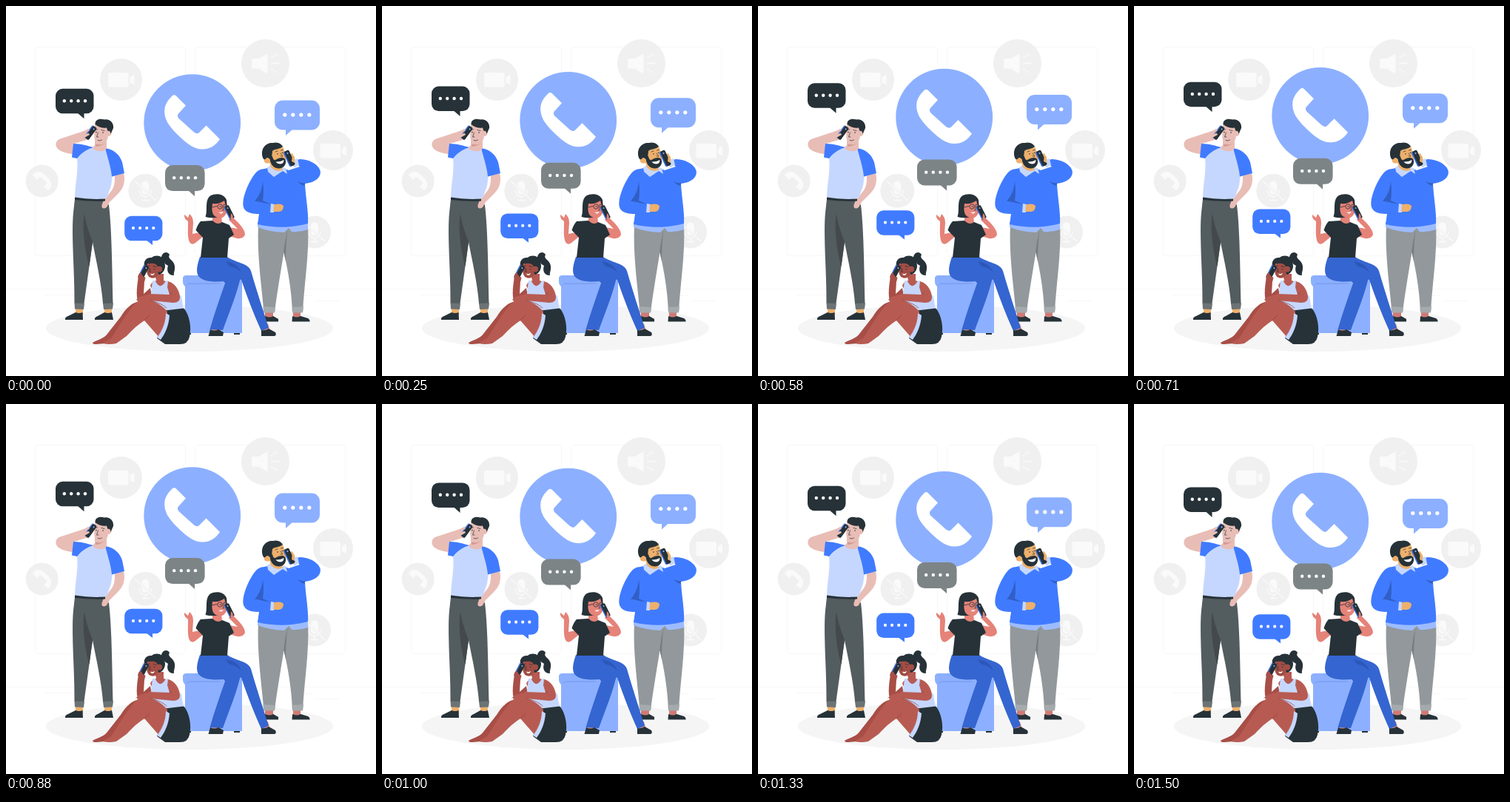
Write an HTML page that moves like this. It is 500x500 px and loops after 1540 ms.

```html
<!DOCTYPE html>
<html lang="en">
<head>
<meta charset="utf-8">
<title>On the phone</title>
<style>
html, body { margin: 0; width: 100%; height: 100%; overflow: hidden; background: #fff; }
svg { display: block; width: 100%; height: 100%; }
.ink { fill: #263238; }
.blue { fill: #407bff; }
.sky { fill: #8cb0ff; }
.ice { fill: #c6d7ff; }
.line { fill: none; stroke: #263238; stroke-width: .7; stroke-linecap: round; stroke-linejoin: round; }
</style>
</head>
<body>
<svg viewBox="0 0 500 500" xmlns="http://www.w3.org/2000/svg">
  <defs>
    <path id="handset" d="M224.500 121.500Q227 119 229.500 121L243 134.500L232.500 146Q231 149 233.500 152L254 170.500Q258 173.500 260.500 171.500L270.500 161.500L289 180C283 189 275 194 264 193.500C252 193 241 183 231 173C220 162 212.500 152 214.500 138C216 131 220 126 224.500 121.500Z"/>
    <g id="camera">
      <rect x="-17.500" y="-9.500" width="27.500" height="19.500" rx="2.500"/>
      <path d="M12 -3L16 -6Q18 -6.500 18 -4.500V5Q18 7 16 6L12 3.500Z"/>
    </g>
    <g id="mic">
      <rect x="-5" y="-13" width="10" height="18" rx="5"/>
      <path d="M-8 -1C-8 11 8 11 8 -1M0 8V13M-5 13H5" fill="none" stroke="#fafafa" stroke-width="1.300"/>
      <path d="M-14 -13L14 13" stroke="#f0f0f0" stroke-width="3"/>
      <path d="M-14 -13L14 13" stroke="#fafafa" stroke-width="1.300"/>
    </g>
    <g id="mobile">
      <rect x="-3.500" y="-10" width="7.500" height="20" rx="1.800" fill="#263238"/>
      <path d="M-3.500 -8V8Q-3.500 10 -1.500 10H-.5Q-2.300 9.500 -2.300 7.500V-7.500Q-2.300 -9.500 -.5 -10Q-3.500 -10 -3.500 -8Z" fill="#407bff"/>
      <circle cx="1" cy="-6.500" r="1" fill="#8cb0ff"/>
    </g>
  </defs>

  <g id="backdrop">
    <g fill="none" stroke="#f7f7f7">
      <rect x="39.500" y="55.500" width="203" height="282" rx="3"/>
      <rect x="255.500" y="55.500" width="203" height="282" rx="3"/>
      <path d="M0 382.500H500M417 398.500H450M398 391.500H414M52 390.500H92M113 398.500H128"/>
    </g>
    <g fill="#f0f0f0">
      <circle cx="155.500" cy="99.500" r="28.500"/>
      <circle cx="350.500" cy="77.500" r="32.500"/>
      <circle cx="442" cy="195" r="27"/>
      <circle cx="48.700" cy="236.500" r="22"/>
      <circle cx="188.300" cy="249.700" r="23"/>
      <circle cx="417" cy="305.500" r="22"/>
    </g>
    <g fill="#fafafa">
      <use href="#camera" x="155.500" y="99.500"/>
      <use href="#camera" x="442" y="195.500"/>
      <use href="#mic" x="188.300" y="249.700"/>
      <use href="#mic" x="417" y="305.500"/>
      <use href="#handset" transform="translate(48.700 236.500) rotate(180) scale(.34) translate(-251 -157)"/>
      <path d="M334 71H341L353.500 64.500V91.500L341 84.500H334Q332 84.500 332 82V73.500Q332 71 334 71Z"/>
      <path d="M358 70L366 65M359 77.500H369M358 85L367 90" stroke="#fafafa" stroke-width="1.300" stroke-linecap="round"/>
    </g>
    <ellipse cx="248" cy="435.500" rx="194" ry="31.500" fill="#f5f5f5"/>
  </g>

  <g id="floating"></g>

  <g id="tall-man">
    <path fill="#eeb06b" d="M94 408H104V418H94ZM133 408H143V418H133Z"/>
    <path class="ink" d="M94 414Q99 416 103.500 414L104 424H80Q79 421 84 419ZM133 414Q138 416 143 414L145 424H120Q119 421 124 419Z"/>
    <path fill="#535c5f" d="M93 261H134L139 269C143 300 143.500 360 144.500 402H131C129 375 122 345 117 319L105.500 402H92.500C93 360 88 310 91 279Z"/>
    <path fill="#43494c" d="M106 281C103 295 105 325 112.500 352L117 319C112 305 108 295 106 281Z"/>
    <path fill="#6c7375" d="M92.500 401.500L106 402L105 410L93 409.500ZM131 402L145 401.500L144 409.500L132 410Z"/>
    <g fill="#e8bdb6">
      <path d="M147 229L159 226C162 238 158 247 152 253L140 265L136 272Q132 275 129.500 272Q129 268 132 263L143 249C147 243 147 237 147 229Z"/>
      <path d="M108 168C96 172 80 177 72 180C66 183 66 190 71 194C77 198 86 200 93 200L95 188C92 187 91 187 92 186L112 180L117 173L116 165Z"/>
    </g>
    <path class="ice" d="M101 193C112 190 128 190 139 194C145 208 145 226 142 243L136 260Q116 263 93 260C93 242 98 225 96 205Z"/>
    <path class="ink" d="M93 258.500Q114 262 134 260.500V263.500Q114 264.500 93 262Z"/>
    <path class="blue" d="M91 186C101 186 111 189 118 191C111 193 102 198 96 206L89 204.500ZM134 192C147 194 154 202 157 211L160 226L143 230.500C142 218 137 204 134 192Z"/>
    <path fill="#e8bdb6" d="M120 180H136V191C136 198 120 198 117 191L120 188Z"/>
    <path fill="#d39d96" d="M121 187Q129 187 135 179V183Q130 190 121 190Z"/>
    <path fill="#e8bdb6" d="M120 160C125 159 136 161 138.500 168Q143 167 142.500 172Q142 176 138 176C137 184 131 188 125 187C119 186 118.500 177 120 160Z"/>
    <path class="ink" d="M120.500 160C120 153 127 151.500 133 153.500C140 152 146 158 145 165L141.500 173Q141 168 137.500 169L136 164.500C131 165.500 125 164 120.500 160Z"/>
    <path class="line" d="M120.500 167.500L123.500 166.800M129 167.500L133 168.500M124.500 171L122.500 177H125M124 181.500Q127 183 129.500 181"/>
    <circle class="ink" cx="122" cy="170.500" r=".8"/><circle class="ink" cx="131" cy="171" r=".8"/>
    <use href="#mobile" transform="translate(114 171) rotate(36)"/>
    <path d="M104 170L111 166L113 168L106 173L112 172L113 174L106 178Z" fill="#e8bdb6"/>
  </g>

  <g id="bearded-man">
    <path fill="#cf7a75" d="M350 411H361V422H350ZM388 411H398V422H388Z"/>
    <path class="ink" d="M350 419Q356 422 361 419L368 423V426.500H347V421ZM387 419Q393 422 398 419L408 422Q411 424 410.500 426.500H386.500Z"/>
    <path fill="#92989b" d="M341 296H408C410 335 403 375 401 414H387C386 385 381 357 375.500 333C371 360 366 390 363 414H348.500C345 375 339 335 341 296Z"/>
    <path fill="#757b7e" d="M380 303C378 315 376 323 375.500 333L378 345C377.500 333 379 319 380 303Z"/>
    <path fill="#a5aaad" d="M347.500 406L364 407L363 414.500H348ZM386.500 407L402 406L401 414.500H387Z"/>
    <path fill="#9dbcff" d="M340 292H408V302Q397 306 386 305L382 300L376 306Q355 305 340 299Z"/>
    <path class="blue" d="M349 220C361 217 374 218 382 222L397 217L390 211L396 207C409 207 421 213 424.500 222C427 232 416 239 404 240C405 260 409 278 408 294Q375 303 340 295L342 281C326 281 319 276 320.500 264C323 247 333 229 340 223Q344 220 349 220Z"/>
    <path fill="#315fc7" d="M347 237C346 248 342 257 336 263.500L358 268L347 263Q349 250 347 237ZM394 237Q400 240 404 239V243Q398 242 394 237Z"/>
    <path class="ice" d="M358 267L363 268L362 279L357 279Z"/>
    <path fill="#eeb06b" d="M362 268.500Q371 266 375 270Q375 277 369 278L361.500 278Z"/>
    <path class="ice" d="M353 218L358 215L378 219L380 227L374 223L362 231L354 224Z"/>
    <path fill="#eeb06b" d="M355 207L372 216L374 221Q366 226 358 218Z"/>
    <path fill="#eeb06b" d="M352 195C355 187 372 185 375 192L378 207C378 214 373 219 366 218C359 217 357 212 356 212Q349 214 348.500 208Q349 203 355 204Z"/>
    <path class="ink" d="M347 205C343 192 352 184 361 185C367 183 373 187 374 190C369 194 363 193 360 196L359 205L356.500 207Q353 203 350.500 207Q348 208 347 205Z"/>
    <path class="ink" d="M356.500 204L360 203Q361 209 364 208Q369 204.500 374 205Q377.500 206 378 209C379 215 374 220 368 219.500C361 219 356.500 213 356.500 204Z"/>
    <path fill="#fff" d="M364.500 210.500Q370 211 375.500 208Q375.500 213 371 213.500Q366.500 213.500 364.500 210.500Z"/>
    <path class="line" d="M364 197L367 196M371.500 195L374.500 194.500M371 199L374 203H371"/>
    <circle class="ink" cx="367" cy="200" r=".8"/><circle class="ink" cx="373.500" cy="198.500" r=".8"/>
    <path fill="#eeb06b" d="M379 202L387 199L390 206L394 212L389 217L381 212Z"/>
    <path class="ice" d="M389 208L394 206L396 215L389 219Z"/>
    <use href="#mobile" transform="translate(382.500 206) rotate(-25) scale(1.100)"/>
    <path fill="#eeb06b" d="M387 201L390 204V212L386 210Z"/>
  </g>

  <g id="seated-woman">
    <path class="ink" d="M243 440H250V444H243ZM308 440H316V444H308Z"/>
    <path class="sky" d="M244 364H314Q319 365 319 371V442H242V379Q239 377 239 372V368Q239 364 244 364Z"/>
    <path fill="#7c9fef" d="M243 378Q245 374.500 249 374.500H290L289 376H250Q246 376 243 378Z"/>
    <path fill="#e58a80" d="M281 430L290 433L287 441L279 439ZM346 430L354 429L357 440L348 441Z"/>
    <path fill="#2c57b7" d="M271 342L318 349L326 360L299 378Z"/>
    <path fill="#3565d0" d="M262 339H299C310 347 327 347 331 358C338 382 347 410 355 435L345 439C336 419 326 394 318 370L300 364Z"/>
    <path fill="#3565d0" d="M262 339H293C304 350 318 352 318 362C313 387 302 413 293 438L275.500 437C282 414 290 392 297 372C280 373 267 373 260 365C256 358 259 348 262 339Z"/>
    <path d="M297 345Q314 348 317.500 360Q313 354 301 351Z" fill="#2c57b7"/>
    <path class="ink" d="M276 437Q282 440 287 437L294 441L293 446H273.500ZM345 438Q350 439 355 436L364 441Q366 445 363 446H345Z"/>
    <g fill="#e58378">
      <path d="M262 306L252 308L253 293Q253 285 248 281L246 286L241 282Q240 287 246 291C246 303 245 313 248 319Q251 324 256 320L267 311Z"/>
      <path d="M302 299L313 301L301 289L305 284L311 290C318 297 323 303 323 309Q321 315 312 314L302 311Z"/>
      <path d="M279 284H291L292 292Q287 300 279 293Z"/>
    </g>
    <path class="ink" d="M263 291L279 290Q286 297 292 292L302 296L308 309L301 314L299 340H263L266 313L256.500 303Q259 295 263 291Z"/>
    <path class="ink" d="M269.500 285C273 276 268 263 276 256.500C284 252 295 254 298 262C299 272 300 280 294 284Q280 288 269.500 285Z"/>
    <path fill="#e58378" d="M279 267Q288 268 295 263L298 273C299 283 293 288 287 286C280 285 277 279 279 267Z"/>
    <g fill="none" stroke="#263238" stroke-width=".8">
      <circle cx="289" cy="271" r="3.200"/><circle cx="296" cy="270.500" r="2.500"/>
      <path d="M285.500 270.500L278 272"/>
    </g>
    <circle class="ink" cx="289.500" cy="271" r=".8"/><circle class="ink" cx="296" cy="270.500" r=".7"/>
    <path fill="#fff" d="M287.500 278.500Q291 279.500 293.500 277.500Q293 280.500 290.500 280.500Q288.500 280.500 287.500 278.500Z"/>
    <path class="line" d="M293 273L294.500 276H292.500M287 266L290 265"/>
    <use href="#mobile" transform="translate(301.500 279) rotate(-27) scale(.95)"/>
    <path fill="#e58378" d="M304 280L306.500 283L307 289L303.500 288Z"/>
  </g>

  <g id="floor-girl">
    <path class="ink" d="M210 342C209 333 218 330 221 336C218 341 224 342 227 348C230 355 226 360 227 364C218 364 217 356 219 351Q216 350 213 346Z"/>
    <path class="ink" d="M217 411L241 409C248 419 251 434 248 447Q246 457 235 457H215L204 449Z"/>
    <path fill="#a84e46" d="M178 372L187 372L186 389L195 381L197 392L192 399H179Q175 394 178 372Z"/>
    <path fill="#a84e46" d="M181 399C169 401 162 409 155 420L137 443C132 450 121 452 117 455Q117 457 122 457L146 455L181 423Z"/>
    <path fill="#b75b52" d="M201 362H213V371L222 374L218 384H198L195 378Q196 373 203 371Z"/>
    <path class="ice" d="M198 371L201.500 371Q208 385 216 371.500L219 371L222 380L237 392L240 411L216 414L195 396Z"/>
    <path class="ink" d="M215 411.500L240 408.500V414.500L214 418Z"/>
    <path fill="#b75b52" d="M180 397C193 394 209 402 218 413C219 427 214 440 208 449L187 425C179 430 171 437 163 446L149 456Q139 458 131 456Q134 453 142 449C154 432 163 413 180 397Z"/>
    <path class="ice" d="M216 415L221 418C220 432 215 443 209 451L204 448C211 439 216 428 216 415Z"/>
    <path fill="#b75b52" d="M219 372C229 374 235 386 235 394Q235 401 226 401L195 398Q184 404 176 397Q180 392 188 391L194 389L221 390L218 380Z"/>
    <path class="line" style="stroke:#8b3e38" d="M196 398Q211 402 217 408M187 425L194 418M221 390L224 388"/>
    <path class="ink" d="M188 354C184 345 190 339 197 340C203 335 213 338 214 346C217 354 213 361 207 363Z"/>
    <path fill="#a24e46" d="M191 348C196 348 202 346 205 352Q212 351 211 357Q209 361 206 359C205 367 200 369 195 367C190 365 189 356 191 348Z"/>
    <path fill="#fff" d="M195 361.500Q198 363 201 361Q200 364 197.500 364Q195.500 363.500 195 361.500Z"/>
    <path class="line" d="M191.500 352L194 351M199 351.500L203 352.500M195 355L193.500 359H195.500"/>
    <circle class="ink" cx="193" cy="355" r=".7"/><circle class="ink" cx="200.500" cy="355.500" r=".7"/>
    <use href="#mobile" transform="translate(185.500 359.500) rotate(27)"/>
    <path fill="#a84e46" d="M179 363L182 360L185 365L188.500 367L187 373L178 373Z"/>
  </g>
</svg>
<script>
const PERIOD = 1540, LOW = 710, RISE = 10, REST = 0.85;
const floating = document.getElementById('floating');

// Rounded bubble with four evenly spaced dots; tail is a small triangle.
function bubble(x, y, w, h, r, fill, tail, dotX, gap, dotR) {
  let dots = '';
  for (let i = 0; i < 4; i++) {
    dots += `<circle cx="${dotX + i * gap}" cy="${y + h / 2 - 0.4}" r="${dotR}" fill="#fff"/>`;
  }
  return `<g fill="${fill}"><rect x="${x}" y="${y}" width="${w}" height="${h}" rx="${r}"/>` +
    `<path d="${tail}"/>${dots}</g>`;
}

floating.innerHTML =
  '<circle class="sky" cx="251.7" cy="157.6" r="65.4"/><use href="#handset" fill="#fff"/>' +
  bubble(67, 111.800, 51.5, 33.5, 9.5, '#263238', 'M96 144L105.500 152.300V143Z', 78.8, 9.4, 2.2) +
  bubble(160.200, 283.700, 51.2, 33.5, 9.5, '#407bff', 'M189 316L198 322.900V315Z', 172, 9.1, 2.1) +
  bubble(215, 215, 53.6, 35, 10, '#7d8486', 'M246 249L255 257V248Z', 227.2, 9.6, 2.2) +
  bubble(363, 127.400, 61, 40, 11, '#8cb0ff', 'M378 165V175L388 166Z', 376.8, 11, 2.6);

// Constant-speed rise and fall.
function draw(t) {
  const phase = (((t - LOW) % PERIOD) + PERIOD) % PERIOD / PERIOD;
  const height = Math.abs(1 - 2 * phase);
  floating.setAttribute('transform', `translate(0 ${(REST - RISE * height).toFixed(3)})`);
}

let start;
function tick(now) {
  if (start === undefined) start = now;
  draw(now - start);
  requestAnimationFrame(tick);
}
draw(0);
requestAnimationFrame(tick);
</script>
</body>
</html>
```
